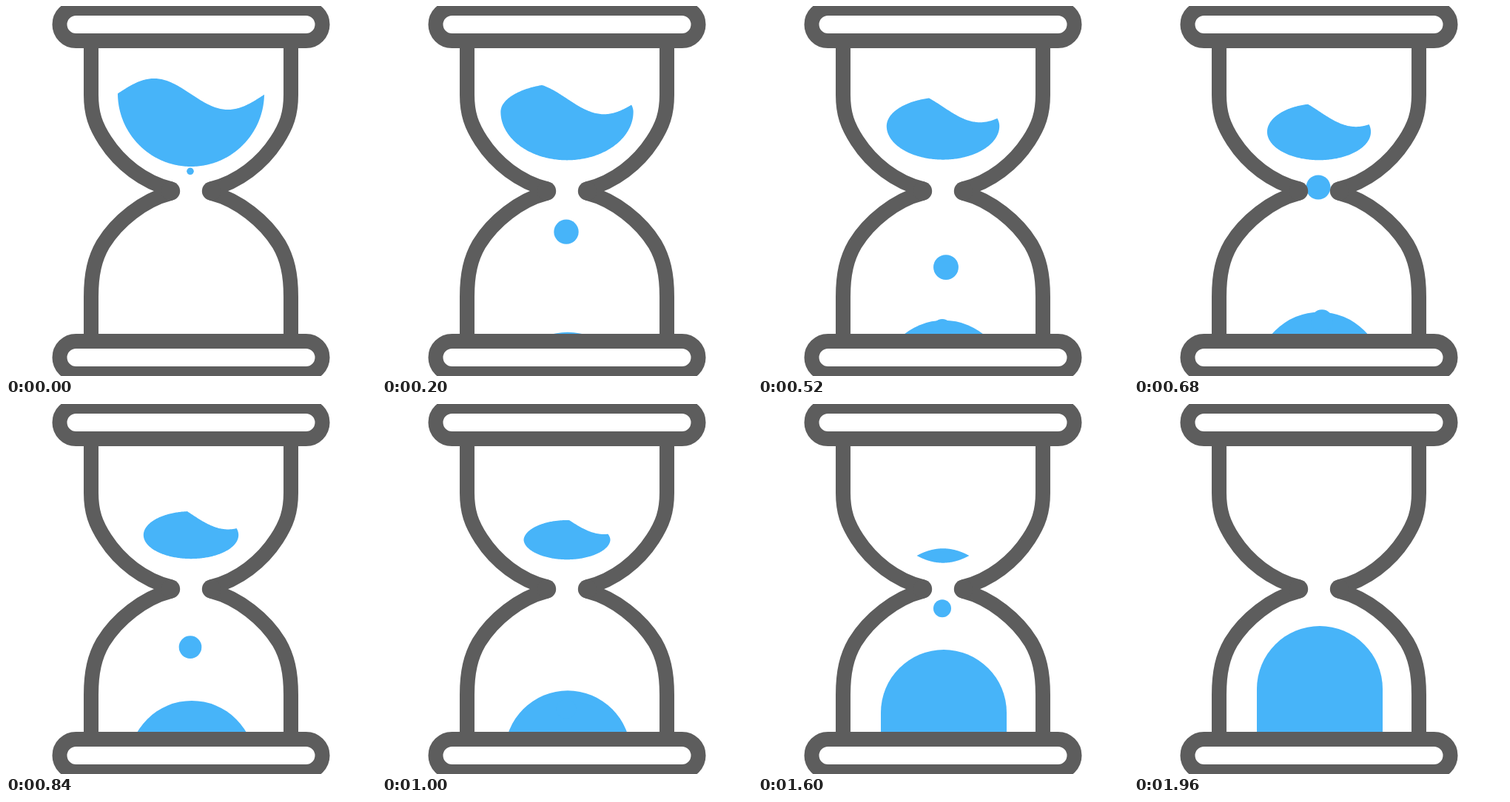
Animation of 500x500 px, one loop 2000 ms. Source, as an HTML page with a canvas:

```html
<!DOCTYPE html>
<html lang="en">
<head>
<meta charset="utf-8">
<title>Hourglass</title>
<style>
html, body { margin: 0; width: 100%; height: 100%; overflow: hidden; background: #fff; }
canvas { display: block; width: 500px; height: 500px; }
</style>
</head>
<body>
<canvas id="stage" width="500" height="500"></canvas>
<script>
const ctx = document.getElementById('stage').getContext('2d');
const LOOP = 2000, STEP = 40;
const GREY = '#5d5d5d', BLUE = '#47b4f9';
const MID = 250, NECK = 245, FLOOR = 443;

// Each drop: time it passes the neck, radius, x
const drops = [[53, 17.3, 249], [280, 19, 254], [680, 16.5, 249], [1222, 19, 249], [1554, 12, 249]];

const clamp = (v, lo, hi) => Math.min(hi, Math.max(lo, v));

function disc(x, y, r) {
  ctx.beginPath();
  ctx.arc(x, y, r, 0, Math.PI * 2);
  ctx.fill();
}

// A shrinking lens whose top is cut by a sinking wave
function drawPool(t) {
  const s = Math.min(1, t / 1920);
  const half = 99 * Math.pow(1 - s, 0.95 - 0.45 * s);
  if (half < 1) return;
  const rim = 118 + 97 * Math.pow(s, 0.6);
  const depth = 217 - 9.5 * Math.sin(Math.PI * Math.pow(s, 0.45)) - rim;
  const dome = Math.min(39, depth);
  const power = 0.5 + 0.5 * clamp(3 * s - 1.5, 0, 1);
  const level = 119 + 0.03 * t + 0.000006 * t * t;
  const top = [], base = [];
  for (let i = 0; i <= 160; i++) {
    const u = -Math.cos(Math.PI * i / 160);
    const x = MID + u * half;
    const bulge = Math.pow(Math.max(0, 1 - u * u), power);
    const low = rim + depth * bulge;
    const wave = level + 21 * Math.sin((x - MID) / 100 * Math.PI);
    top.push([x, clamp(wave, rim - dome * bulge, low)]);
    base.unshift([x, low]);
  }
  ctx.beginPath();
  for (const [x, y] of [...top, ...base]) ctx.lineTo(x, y);
  ctx.fill();
}

function drawHeap(t) {
  const s = t / 1960, r = 85;
  const cy = 445 - 145 * Math.pow(s, 1.6 - 0.45 * s) + r;
  disc(251, cy, r);
  if (cy < FLOOR) ctx.fillRect(251 - r, cy, 2 * r, FLOOR - cy);
}

// Later drops fall a little faster; all swell at the neck, then thin out
function drawDrops(t) {
  for (const [birth, size, x] of drops) {
    const y = NECK + (t - birth) * (0.4 + 0.00018 * birth);
    if (y < 220 || y > 470) continue;
    const swell = clamp((y - 215) / 30, 0, 1);
    disc(x, y, size * swell * (1 - 0.0015 * Math.max(0, y - 281)));
  }
}

const wall = new Path2D(
  'M115 47V120C115 146 121 162 134 182C154 213 186 238 222 247' +
  'M115 453V393C115 362 120 341 131 322C150 291 186 262 222 253');

function bar(y) {
  ctx.beginPath();
  ctx.roundRect(72.5, y, 355, 44, 22);
  ctx.stroke();
}

function drawSide() {
  ctx.stroke(wall);
  disc(222.5, 250, 12.7);
}

function drawGlass() {
  ctx.strokeStyle = ctx.fillStyle = GREY;
  ctx.lineWidth = 20;
  ctx.lineCap = 'round';
  // The caps at the bars stay inside the bar strokes
  drawSide();
  ctx.save();
  ctx.translate(500, 0);
  ctx.scale(-1, 1);
  drawSide();
  ctx.restore();
  bar(3);
  bar(453);
}

function draw(t) {
  ctx.fillStyle = '#fff';
  ctx.fillRect(0, 0, 500, 500);
  ctx.save();
  ctx.beginPath();
  ctx.rect(0, 0, 500, FLOOR);
  ctx.clip();
  ctx.fillStyle = BLUE;
  drawPool(t);
  drawHeap(t);
  drawDrops(t);
  ctx.restore();
  drawGlass();
}

const start = performance.now();
function tick() {
  const t = (performance.now() - start) % LOOP;
  draw(Math.floor(t / STEP) * STEP);
  requestAnimationFrame(tick);
}
tick();
</script>
</body>
</html>
```
